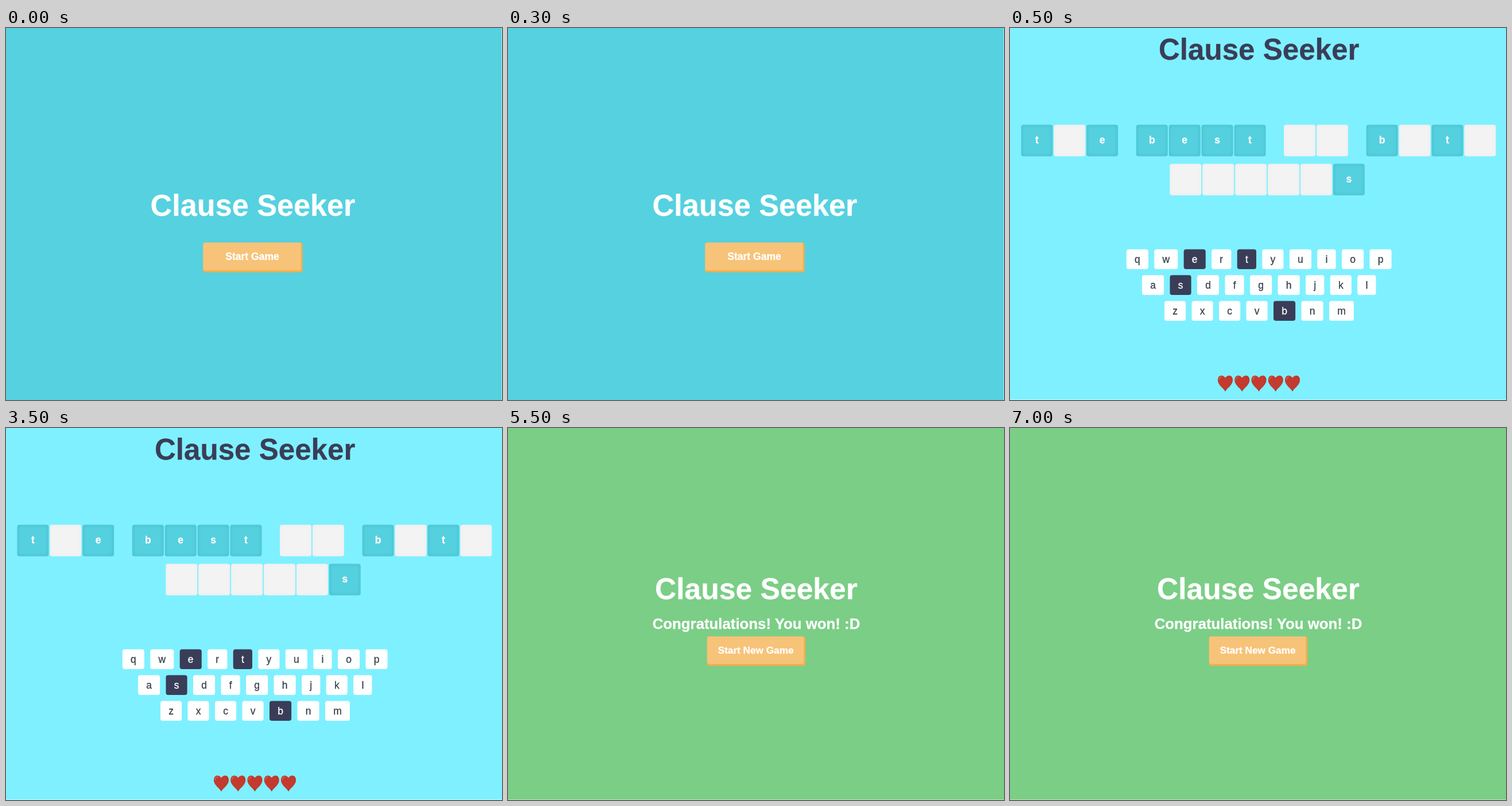
These frames come from a looping animation (864x648 px, 8 s). An HTML page:

```html
<!DOCTYPE html>
<html lang="en">
<head>
<meta charset="utf-8">
<title>Clause Seeker</title>
<style>
  html, body { margin: 0; width: 100%; height: 100%; overflow: hidden; }
  svg { display: block; width: 100vw; height: 100vh; }
  text { font-family: "Liberation Sans", Arial, sans-serif; text-anchor: middle; stroke-width: .3; }
</style>
</head>
<body>
<svg id="stage" viewBox="0 0 864 648">
  <defs>
    <clipPath id="tileClip"><rect width="55" height="55" rx="4"/></clipPath>
    <filter id="soft" x="-20%" y="-20%" width="140%" height="140%"><feGaussianBlur stdDeviation="2.5"/></filter>
    <radialGradient id="red" cx=".5" cy=".4" r=".65">
      <stop offset=".6" stop-color="#c43a2f"/>
      <stop offset="1" stop-color="#a93226"/>
    </radialGradient>
    <g id="heart">
      <path fill="url(#red)" d="M0 4.6C-2-.6-13-2.4-13 8.6C-13 17-3.5 22 0 28.2C3.5 22 13 17 13 8.6C13-2.4 2-.6 0 4.6Z"/>
      <path fill="none" stroke="#e2705f" stroke-width="1.3" stroke-linecap="round" d="M-10.6 7.5Q-10 3.4-6.8 2.7"/>
    </g>
  </defs>
</svg>
<script>
const NS = "http://www.w3.org/2000/svg";
const NAME = "Clause Seeker";
const DARK = "#3a3d57";
const LOOP = 8000;

function add(parent, tag, attrs, content) {
  const el = document.createElementNS(NS, tag);
  for (const key in attrs) el.setAttribute(key, attrs[key]);
  if (content) el.textContent = content;
  parent.appendChild(el);
  return el;
}

function box(parent, x, y, width, height, fill, rx = 0) {
  return add(parent, "rect", { x, y, width, height, fill, rx });
}

function label(parent, content, x, y, size, fill = "#fff", weight = 700) {
  add(parent, "text", { x, y, fill, stroke: fill, "font-size": size, "font-weight": weight }, content);
}

function button(parent, content, x, y, w, h, textX, textY, size) {
  box(parent, x, y, w, h, "#f0b04f", 4);
  box(parent, x, y, w - 3, h - 3.5, "#f7c378", 3.5);
  label(parent, content, textX, textY, size);
}

const stage = document.getElementById("stage");
box(stage, 0, 0, 864, 648, "#fff");

function scene(w, h, color) {
  const g = add(stage, "g", {});
  box(g, 0, 0, w, h, color);
  return g;
}

function startScene() {
  const g = scene(863.5, 648, "#55d1e0");
  label(g, NAME, 430, 327, 52.2);
  button(g, "Start Game", 343.3, 373.8, 173.4, 52, 429, 404, 17.5);
  return g;
}

function tile(parent, x, y, letter) {
  const shown = letter !== "_";
  const g = add(parent, "g", { transform: `translate(${x} ${y})`, "clip-path": "url(#tileClip)" });
  box(g, 0, 0, 55, 55, shown ? "#55d0df" : "#f3f3f3", 4);
  add(g, "rect", {
    width: 55, height: 55, rx: 4, fill: "none", filter: "url(#soft)",
    stroke: shown ? "#49c0cf" : "#efefef", "stroke-width": 4
  });
  if (shown) label(g, letter, 27.5, 32.8, 17.5);
}

function word(parent, letters, x, y) {
  [...letters].forEach((c, i) => tile(parent, x + i * 56.9, y, c));
}

function keyRow(parent, letters, x, y) {
  const pen = document.createElement("canvas").getContext("2d");
  pen.font = '17.5px "Liberation Sans", Arial, sans-serif';
  for (const c of letters) {
    const w = pen.measureText(c).width + 28.4;
    const used = "best".includes(c);
    box(parent, x, y, w, 34.5, used ? DARK : "#fff", 4);
    label(parent, c, x + w / 2, y + 23.2, 17.5, used ? "#fff" : "#37404c", 400);
    x += w + 10.35;
  }
}

function playScene() {
  const g = scene(864, 647.5, "#7ff0ff");
  label(g, NAME, 433.6, 55, 51.1, DARK);

  word(g, "t_e", 19.4, 168.4);
  word(g, "best", 219.8, 168.4);
  word(g, "__", 477, 168.4);
  word(g, "b_t_", 620.6, 168.4);
  word(g, "_____s", 278.3, 236.6);

  keyRow(g, "qwertyuiop", 202.8, 385.5);
  keyRow(g, "asdfghjkl", 230, 430.5);
  keyRow(g, "zxcvbnm", 269, 475.4);

  for (let i = 0; i < 5; i++) {
    add(g, "use", { href: "#heart", x: 375 + i * 29.25, y: 605 });
  }
  return g;
}

function winScene() {
  const g = scene(864, 647.5, "#7bce86");
  label(g, NAME, 432.4, 297.5, 51.6);
  label(g, "Congratulations! You won! :D", 432.5, 350, 25.8);
  button(g, "Start New Game", 346.8, 363, 171.5, 51.5, 431.6, 393, 17.2);
  return g;
}

const scenes = [
  { until: 500, node: startScene() },
  { until: 5500, node: playScene() },
  { until: LOOP, node: winScene() }
];

function draw(time) {
  const t = time % LOOP;
  const current = scenes.find(s => t < s.until);
  for (const s of scenes) s.node.setAttribute("display", s === current ? "inline" : "none");
}

function tick() {
  draw(performance.now());
  requestAnimationFrame(tick);
}
tick();
</script>
</body>
</html>
```
